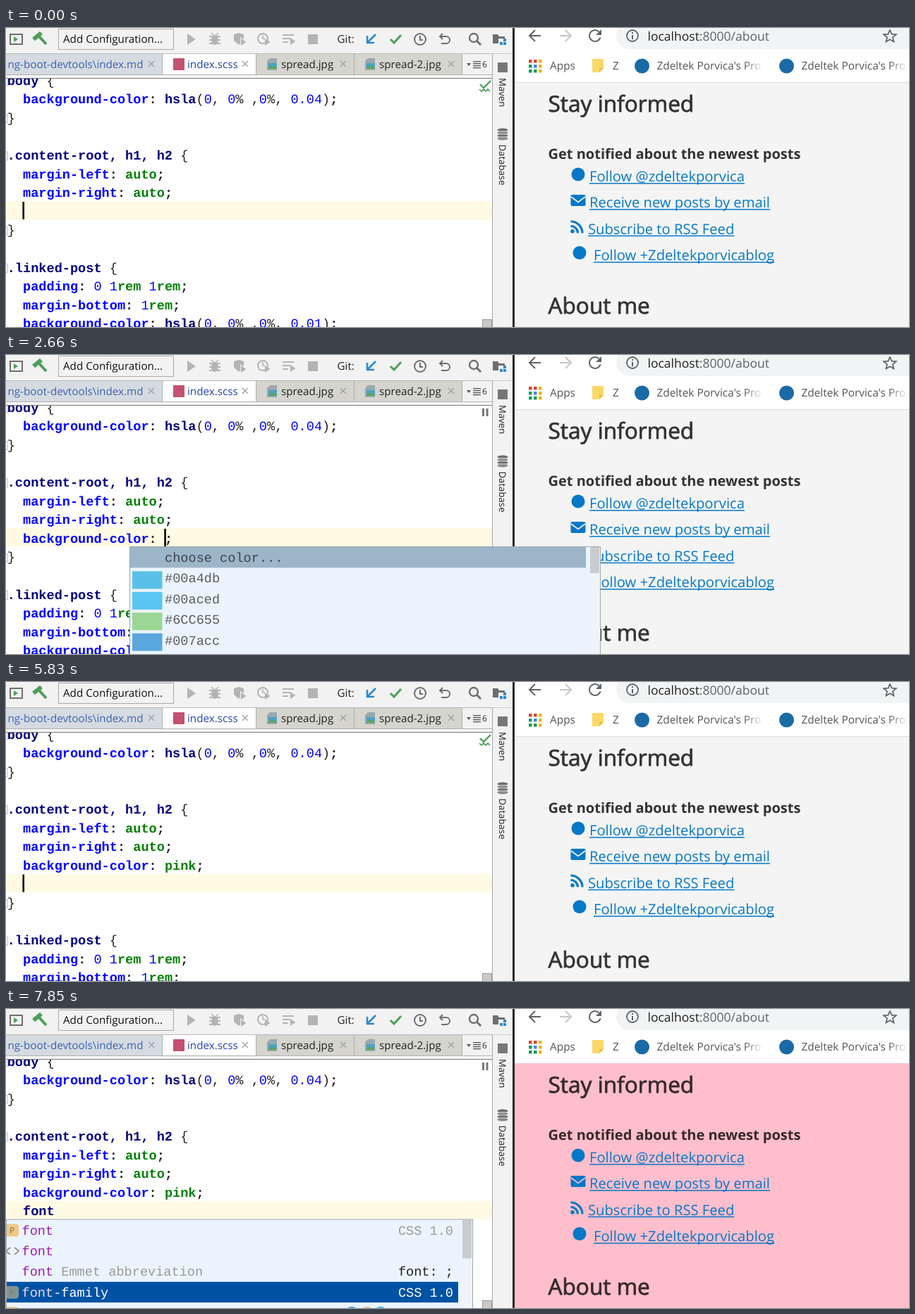
An HTML page with a canvas for the animation above (8000 ms loop, 1280 by 425 pixels).

```html
<!DOCTYPE html>
<html lang="en">
<head>
<meta charset="utf-8">
<title>Live styling</title>
<style>
html, body { margin: 0; width: 100%; height: 100%; overflow: hidden; background: #f2f2f2; }
canvas { display: block; width: 1280px; height: 425px; }
</style>
</head>
<body>
<canvas id="stage" width="1280" height="425"></canvas>
<script>
const g = document.getElementById('stage').getContext('2d');
const LOOP = 8000, TAU = Math.PI * 2;
const CW = 11.16, LINE = 26.6, CODE_X = 1.7, ROW = 29.4;
const MONO = '18.6px "Liberation Mono", "Courier New", monospace';
const UI = '"Open Sans", "Noto Sans", sans-serif';
const NAVY = '#000080', BLUE = '#0000ff', GREEN = '#008000', LINK = '#0678c8', ICON = '#6e6e6e';

// ---------- helpers ----------
function text(s, x, y, size, color, align = 'left', weight = '') {
  g.font = `${weight} ${size}px ${UI}`;
  g.fillStyle = color;
  g.textAlign = align;
  g.fillText(s, x, y);
}
function mono(s, x, y, color, bold, align = 'left') {
  g.font = (bold ? 'bold ' : '') + MONO;
  g.fillStyle = color;
  g.textAlign = align;
  g.fillText(s, x, y);
}
function rect(x, y, w, h, color) {
  g.fillStyle = color;
  g.fillRect(x, y, w, h);
}
function frame(x, y, w, h, color, lw = 1) {
  g.strokeStyle = color;
  g.lineWidth = lw;
  g.strokeRect(x, y, w, h);
}
function round(x, y, w, h, r, color) {
  g.beginPath();
  g.roundRect(x, y, w, h, r);
  g.fillStyle = color;
  g.fill();
}
function oval(x, y, rx, ry, color) {
  g.beginPath();
  g.ellipse(x, y, rx, ry, 0, 0, TAU);
  g.fillStyle = color;
  g.fill();
}
const disc = (x, y, r, color) => oval(x, y, r, r, color);
function arc(x, y, r, color, w = 2, a = 0, b = TAU) {
  g.beginPath();
  g.arc(x, y, r, a, b);
  g.strokeStyle = color;
  g.lineWidth = w;
  g.stroke();
}
function trace(p) {
  g.beginPath();
  for (let i = 0; i < p.length; i += 2) g.lineTo(p[i], p[i + 1]);
}
function line(p, color, w = 2) {
  trace(p);
  g.strokeStyle = color;
  g.lineWidth = w;
  g.stroke();
}
function poly(p, color) {
  trace(p);
  g.fillStyle = color;
  g.fill();
}
function clipped(x, y, w, h, draw) {
  g.save();
  g.beginPath();
  g.rect(x, y, w, h);
  g.clip();
  draw();
  g.restore();
}

// ---------- completion lists ----------
const item = (name, right = '', icon = 'P', extra = '') => ({ name, right, icon, extra });
const emmet = (name, right) => item(name, right, '', ' Emmet abbreviation');
const color = (name, hex) => ({ ...item(name, hex === name ? '' : hex), swatch: hex });
const hexes = list => list.map(h => color(h, h));

const backRows = w => [
  emmet(w, 'background: #;'),
  item('background-color', 'CSS 1.0'),
  item('background', 'CSS 1.0'),
  item('backdrop-filter', 'CSS 3.0'),
  { ...item('backface-visibility', 'CSS 3.0'), marks: [[510, '#d9531e'], [533, '#57b8ea']] }
];
const fontTail = { ...item(''), marks: [[490, '#57a8e0'], [512, '#e6c9a0'], [531, '#57b8ea']] };
const fontRows = w => [
  emmet(w, 'font: ;'), item('font-family', 'CSS 1.0'), item('font', 'CSS 1.0'), item('font', '', '<>'), fontTail
];
const fontDone = () => [
  item('font', 'CSS 1.0'), item('font', '', '<>'), emmet('font', 'font: ;'), item('font-family', 'CSS 1.0'), fontTail
];

const popBack = { left: 0, right: 661, thumb: 113, rows: backRows };
const popFont = { left: 0, right: 661, thumb: 36, rows: fontRows };
const popDone = { left: 0, right: 661, thumb: 55, rows: fontDone };
const popColor = {
  left: 175, right: 842, thumb: 37,
  rows: () => [item('choose color...', '', ''), ...hexes(['#00a4db', '#00aced', '#6CC655', '#007acc', '#0088cc'])]
};
const popPale = {
  left: 175, right: 842, thumb: 80,
  rows: () => [color('palegoldenrod', '#eee8aa'), color('palegreen', '#98fb98'), color('paleturquoise', '#afeeee'),
    color('palevioletred', '#db7093'), color('papayawhip', '#ffefd5')]
};
const popPink = {
  left: 175, right: 842, hint: true,
  rows: () => [color('pink', '#ffc0cb'), color('deeppink', '#ff1493'), color('hotpink', '#ff69b4'), color('lightpink', '#ffb6c1')]
};

// ---------- timeline: "|" marks the caret ----------
const EVENTS = [
  [0, { line: '|', row: 7, caret: true, icon: 'ok', pop: null, sel: 0, active: false, pink: false }],
  [150, { caret: false }],
  [610, { caret: true }],
  [1010, { line: 'b|', icon: 'pause' }],
  [1180, { pop: popBack }],
  [1330, { line: 'ba|' }],
  [1490, { line: 'bac|' }],
  [1570, { line: 'back|' }],
  [2110, { caret: false }],
  [2340, { sel: 1, active: true }],
  [2570, { line: 'background-color: |;', caret: true, pop: null, sel: 0, active: false }],
  [2660, { pop: popColor }],
  [3430, { line: 'background-color: p|;', pop: popPale }],
  [3580, { line: 'background-color: pi|;', pop: popPink }],
  [4190, { line: 'background-color: pink|;', pop: null, icon: '' }],
  [4970, { line: 'background-color: pink;|', icon: 'ok' }],
  [5600, { line: '|', row: 8, icon: 'pause' }],
  [5830, { icon: 'ok' }],
  [6520, { line: 'f|', icon: 'pause' }],
  [6600, { pop: popFont }],
  [6690, { line: 'fo|' }],
  [6830, { line: 'fon|' }],
  [6990, { line: 'font|' }],
  [7070, { pop: popDone }],
  [7630, { caret: false, pink: true }],
  [7850, { sel: 3, active: true }]
];
const stateAt = t => Object.assign({}, ...EVENTS.filter(e => e[0] <= t).map(e => e[1]));

// ---------- editor ----------
const HEAD = ['body {', '  background-color: hsla(0, 0% ,0%, 0.04);', '}', '',
  '.content-root, h1, h2 {', '  margin-left: auto;', '  margin-right: auto;'];
const TAIL = ['}', '', '.linked-post {', '  padding: 0 1rem 1rem;', '  margin-bottom: 1rem;',
  '  background-color: hsla(0, 0% ,0%, 0.01);'];

function tokens(src) {
  const prop = /^( +[\w-]+)(:.*)$/.exec(src);
  if (!prop) return src.split(/([{}])/).map(s => /[{}]/.test(s) ? [s, '#222'] : [s, NAVY, true]);
  const out = [[prop[1], BLUE, true]];
  for (const [s] of prop[2].matchAll(/[\d.]+|hsla|[a-z]+|[^\da-z]/g)) {
    if (/\d/.test(s)) out.push([s, BLUE]);
    else if (s === 'hsla') out.push([s, NAVY, true]);
    else if (/[a-z]/.test(s)) out.push([s, GREEN, true]);
    else out.push([s, '#222', s === ':' || s === ';']);
  }
  return out;
}
function codeLine(src, row) {
  const y = 80.5 + row * LINE;
  let col = 0;
  for (const [s, c, bold] of tokens(src)) {
    mono(s, CODE_X + col * CW, y, c, bold);
    col += s.length;
  }
  if (/[{}]/.test(src)) line([0, y - 11, 2, y - 11, 2, y + 1, 0, y + 1], '#b5b5b5', 1);
}
function editor(s) {
  rect(0, 72, 689, 353, '#fff');
  const top = 246 + (s.row - 7) * LINE;
  rect(0, top, 689, LINE, '#fffae3');
  const typed = '  ' + s.line.replace('|', '');
  const done = s.row > 7 ? ['  background-color: pink;'] : [];
  clipped(0, 72, 689, 353, () => [...HEAD, ...done, typed, ...TAIL].forEach(codeLine));
  if (s.caret) rect(23.4 + s.line.indexOf('|') * CW, top + 1, 2.6, 25, '#000');
  if (s.icon === 'pause') {
    rect(675, 76, 3, 11, '#777');
    rect(680.5, 76, 3, 11, '#777');
  } else if (s.icon === 'ok') {
    line([672, 80, 677, 85, 687, 75], '#4c9f57', 2.4);
    line([671, 87, 674, 90, 677, 87, 680, 90, 683, 87, 686, 90], '#4c9f57', 1.6);
  }
  rect(675, 414, 14, 11, '#999');
  rect(676, 415, 12, 10, '#c9c9c9');
}

// ---------- popup ----------
function rowIcon(kind, y) {
  if (kind === 'P') {
    round(-3, y - 10, 21, 18, 4, '#efc987');
    text('P', 8.5, y + 3.5, 12, '#77684a', 'center');
  } else if (kind === '<>') {
    line([6, y - 6, 0, y - 1, 6, y + 4], '#777', 1.5);
    line([12, y - 6, 18, y - 1, 12, y + 4], '#777', 1.5);
  }
}
function popupRow(r, y, p, chosen, active, word) {
  const strong = chosen && active;
  const main = strong ? '#fff' : '#000', match = strong ? '#f0d8fa' : '#a31bb5';
  const at = Math.max(0, r.name.indexOf(word)), end = at + word.length;
  const pieces = [[r.name.slice(0, at), main], [r.name.slice(at, end), word ? match : main],
    [r.name.slice(end), main], [r.extra, chosen ? '#333' : '#999']];
  const dim = active ? 1 : 0.62;

  g.globalAlpha = strong ? 0.55 : dim;
  if (r.swatch) rect(179, y - 11, 42.5, 25, r.swatch);
  else rowIcon(r.icon, y);

  g.globalAlpha = dim;
  let x = p.left ? 225 : 22.5;
  for (const [s, c] of pieces) {
    mono(s, x, y + 5, c);
    x += s.length * CW;
  }
  const soft = /^CSS/.test(r.right) && !chosen;
  mono(r.right, p.right - 27, y + 5, strong ? '#fff' : soft ? '#999' : '#222', false, 'right');
  for (const [mx, c] of r.marks || []) disc(mx, y - 1, 9.5, c);
  g.globalAlpha = 1;
}
function popup(s) {
  const p = s.pop, left = p.left, top = 272 + (s.row - 7) * LINE;
  const width = p.right - left, height = (p.hint ? 411 : 430) - top;
  const word = /[a-z]*$/.exec(s.line.split('|')[0])[0];
  rect(left, top, width + 1, height, '#ebf4fe');
  p.rows(word).forEach((r, i) => {
    const chosen = i === s.sel;
    if (chosen) rect(left, top + 1 + i * ROW, width - 20, ROW, s.active ? '#0052a4' : '#9db5c8');
    popupRow(r, top + 17 + i * ROW, p, chosen, s.active, word);
  });
  if (p.thumb) {
    rect(p.right - 15, top, 15, height, '#f0f4f8');
    rect(p.right - 14, top + 1, 13, p.thumb, '#c9cccf');
  }
  if (p.hint) {
    rect(left, 391, width, 20, '#f0f5fa');
    text('Press Ctrl+. to choose the selected (or first) suggestion and insert a dot afterwards', 178, 405, 12.7, '#222');
    text('>>', 671, 405, 12.7, '#2a5bd7');
    rect(671, 407, 18, 1, '#2a5bd7');
    rect(823, 391, 18, 19, '#cfe4f6');
    frame(823.5, 391.5, 17, 18, '#8fb2cc');
    text('π', 832, 406, 17, '#3c7fb5', 'center');
  }
  frame(left + 0.5, top + 0.5, width, height - 1, '#a0a6ab');
}

// ---------- IDE frame ----------
function play(x, y, k, c) {
  poly([x, y - k, x + k * 1.5, y, x, y + k], c);
}
function toolbar() {
  const off = '#b4b4b4';
  rect(0, 0, 719, 72, '#f2f2f2');
  frame(6, 9, 17, 14, ICON, 2);
  play(11, 16, 4, '#4c9f57');
  line([46, 11, 57, 23], '#4c9f57', 4);
  line([39, 16, 50, 7], '#4c9f57', 6);
  rect(74, 1, 164, 30, '#a9a9a9');
  rect(75, 2, 162, 28, '#f2f2f2');
  text('Add Configuration...', 81, 21, 15.2, '#111');
  play(257, 16, 8, off);
  oval(296, 17, 5, 7, off);
  for (const y of [12, 17, 22]) line([288, y, 304, y], off, 2);
  line([291, 7, 295, 11, 297, 11, 301, 7], off, 1.5);
  poly([323, 9, 330, 7, 337, 9, 337, 17, 330, 24, 323, 18], off);
  play(332, 19, 6, '#f2f2f2');
  play(333, 20, 5, off);
  arc(364, 15, 7, off);
  line([364, 10, 364, 15, 367, 15], off, 1.6);
  play(367, 20, 5, off);
  for (let i = 0; i < 3; i++) rect(392, 9 + i * 5, 16 - i * 4, 2, off);
  play(403, 19, 5, off);
  rect(428, 9, 14, 14, off);
  text('Git:', 469.5, 21, 15.2, '#222');
  line([524, 9, 513, 20], '#2b8ad0', 2.6);
  line([512, 11, 512, 21, 522, 21], '#2b8ad0', 2.6);
  line([545, 16, 550, 21, 560, 10], '#4c9f57', 3);
  arc(587, 16, 8, ICON);
  line([587, 11, 587, 17, 591, 17], ICON);
  line([619, 8, 615, 12, 619, 16], ICON);
  line([615, 12, 624, 12], ICON);
  arc(624, 17, 5, ICON, 2, -TAU / 4, TAU / 4);
  line([624, 22, 617, 22], ICON);
  arc(663, 14, 6, ICON, 2.4);
  line([667, 18, 673, 24], ICON, 3);
  poly([690, 9, 697, 9, 699, 12, 707, 12, 707, 22, 690, 22], ICON);
  rect(698, 15, 12, 10, '#f2f2f2');
  for (const [x, y] of [[700, 20], [705, 20], [705, 15]]) rect(x, y, 4, 4, '#2b8ad0');
}
function closeMark(x) {
  line([x - 4, 47, x + 4, 55], '#a0a0a0', 1.2);
  line([x + 4, 47, x - 4, 55], '#a0a0a0', 1.2);
}
function tab(x, w, fill, label, tx, c, align) {
  rect(x, 37, w, 29, fill);
  rect(x + w - 1, 37, 1, 29, '#b0b0b0');
  text(label, tx, 57, 15.2, c, align);
  closeMark(x + w - 16);
}
function picture(x) {
  poly([x + 4, 43, x + 14, 43, x + 14, 60, x, 60, x, 47], '#9aa7b0');
  rect(x + 2, 50, 12, 8, '#4aa3c2');
  poly([x + 2, 58, x + 6, 53, x + 9, 56, x + 11, 54, x + 14, 58], '#5fa64e');
}
function tabs() {
  rect(0, 36, 689, 1, '#b8b8b8');
  tab(0, 222, '#d5dbe0', 'ng-boot-devtools\\index.md', 194.5, '#3a62b8', 'right');
  tab(222, 133, '#ffffff', 'index.scss', 257, '#2546a8');
  round(237, 43, 16, 17, 1, '#c4516f');
  tab(355, 139, '#d5d5ce', 'spread.jpg', 390, '#222');
  picture(370);
  tab(494, 153, '#d5d5ce', 'spread-2.jpg', 529, '#222');
  picture(509);
  poly([653, 50, 659, 50, 656, 54], '#555');
  for (let i = 0; i < 4; i++) rect(662, 47 + i * 3, 11, 1.3, '#555');
  text('6', 675, 56, 12, '#333');
  rect(0, 66, 689, 1, '#b0b0b0');
  rect(0, 67, 689, 4, '#f7f7f7');
  rect(0, 71, 689, 1, '#777');
}
function sideText(s, y) {
  g.save();
  g.translate(699, y);
  g.rotate(TAU / 4);
  text(s, 0, 0, 13.2, '#222');
  g.restore();
}
function sideBar() {
  rect(689, 36, 30, 389, '#f2f2f2');
  rect(689, 36, 1, 389, '#a5a5a5');
  rect(689, 36, 30, 1, '#c8c8c8');
  rect(697, 49, 14, 14, '#777');
  sideText('Maven', 71);
  for (let i = 0; i < 4; i++) {
    oval(704, 145 + i * 4, 7.5, 2.5, i % 2 ? '#8a8a8a' : ICON);
    if (i) rect(697, 142.5 + i * 4, 14, 0.8, '#f2f2f2');
  }
  sideText('Database', 165.5);
  rect(718, 0, 3, 425, '#2a2a2a');
}

// ---------- browser ----------
function arrow(x, dir, c) {
  line([x - 8 * dir, 11, x + 8 * dir, 11], c, 2);
  line([x, 3, x + 8 * dir, 11, x, 19], c, 2);
}
function star(x, y, r) {
  const p = [];
  for (let i = 0; i <= 10; i++) {
    const a = i * TAU / 10 - TAU / 4, k = i % 2 ? r * 0.45 : r;
    p.push(x + k * Math.cos(a), y + k * Math.sin(a));
  }
  line(p, '#5f6368', 1.7);
}
function bookmark(x) {
  disc(x, 54, 10.5, '#1a6aa5');
  text("Zdeltek Porvica's Pro", x + 21, 59, 15.4, '#555');
  const fade = g.createLinearGradient(x + 145, 0, x + 172, 0);
  fade.addColorStop(0, '#fff0');
  fade.addColorStop(1, '#ffff');
  rect(x + 145, 42, 30, 24, fade);
}
function browserBar() {
  rect(721, 0, 559, 77, '#fff');
  arrow(750, -1, '#5f6368');
  arrow(793, 1, '#c4c6c9');
  arc(835, 11, 8, '#5f6368', 2, 0.3, TAU - 0.8);
  poly([844, 2, 844, 10, 836, 10], '#5f6368');
  round(865, -8, 440, 38, 19, '#f1f3f4');
  arc(888, 11, 8, '#5f6368', 1.8);
  rect(887, 10, 2, 6, '#5f6368');
  rect(887, 6, 2, 2, '#5f6368');
  text('localhost', 909.5, 18, 17.5, '#222');
  text(':8000/about', 909.5 + g.measureText('localhost').width, 18, 17.5, '#5f6368');
  star(1253, 12, 9.3);
  const red = '#db4437', amber = '#f4b400', green = '#0f9d58', sky = '#4285f4';
  [red, red, amber, green, sky, amber, green, green, amber].forEach((c, i) =>
    rect(741 + i % 3 * 7, 45 + Math.floor(i / 3) * 7, 4.5, 4.5, c));
  text('Apps', 771, 59, 15.4, '#555');
  poly([831, 44, 847, 44, 847, 57, 841, 63, 831, 63], '#fbd867');
  poly([847, 57, 841, 57, 841, 63], '#e9bd44');
  text('Z', 860, 59, 15.4, '#555');
  bookmark(901.5);
  bookmark(1106.5);
}
function link(s, x, y) {
  text(s, x, y, 20.2, LINK);
  rect(x, y + 2.2, g.measureText(s).width, 1.5, LINK);
}
// a thin outline gives the medium weight
function heading(s, y, ink) {
  text(s, 768.5, y, 31.6, ink);
  g.strokeStyle = ink;
  g.lineWidth = 0.8;
  g.lineJoin = 'round';
  g.strokeText(s, 768.5, y);
  g.lineJoin = 'miter';
}
function page(pink) {
  const paper = pink ? '#ffbecb' : '#f4f4f4', ink = pink ? '#352a2d' : '#333';
  rect(721, 77, 559, 348, paper);
  if (!pink) rect(721, 77, 559, 1, '#dddddd');
  heading('Stay informed', 119, ink);
  text('Get notified about the newest posts', 768.5, 186, 20, ink, 'left', 'bold');
  disc(811, 208, 9.5, LINK);
  link('Follow @zdeltekporvica', 827, 218);
  round(800.5, 237, 21, 16, 2, LINK);
  line([801, 240, 811, 247.5, 821, 240], paper, 1.6);
  link('Receive new posts by email', 827, 255);
  disc(803, 289, 2.8, LINK);
  arc(800.5, 291.5, 10, LINK, 3.2, -TAU / 4, 0);
  arc(800.5, 291.5, 16.5, LINK, 3.2, -TAU / 4, 0);
  link('Subscribe to RSS Feed', 825, 292.5);
  disc(813, 319.5, 9.5, LINK);
  link('Follow +Zdeltekporvicablog', 833, 330);
  heading('About me', 406, ink);
}

function draw(t) {
  const s = stateAt(t);
  g.textRendering = 'geometricPrecision';
  editor(s);
  toolbar();
  tabs();
  sideBar();
  page(s.pink);
  browserBar();
  if (s.pop) popup(s);
}

const start = performance.now();
function tick() {
  draw((performance.now() - start) % LOOP);
  requestAnimationFrame(tick);
}
tick();
</script>
</body>
</html>
```
